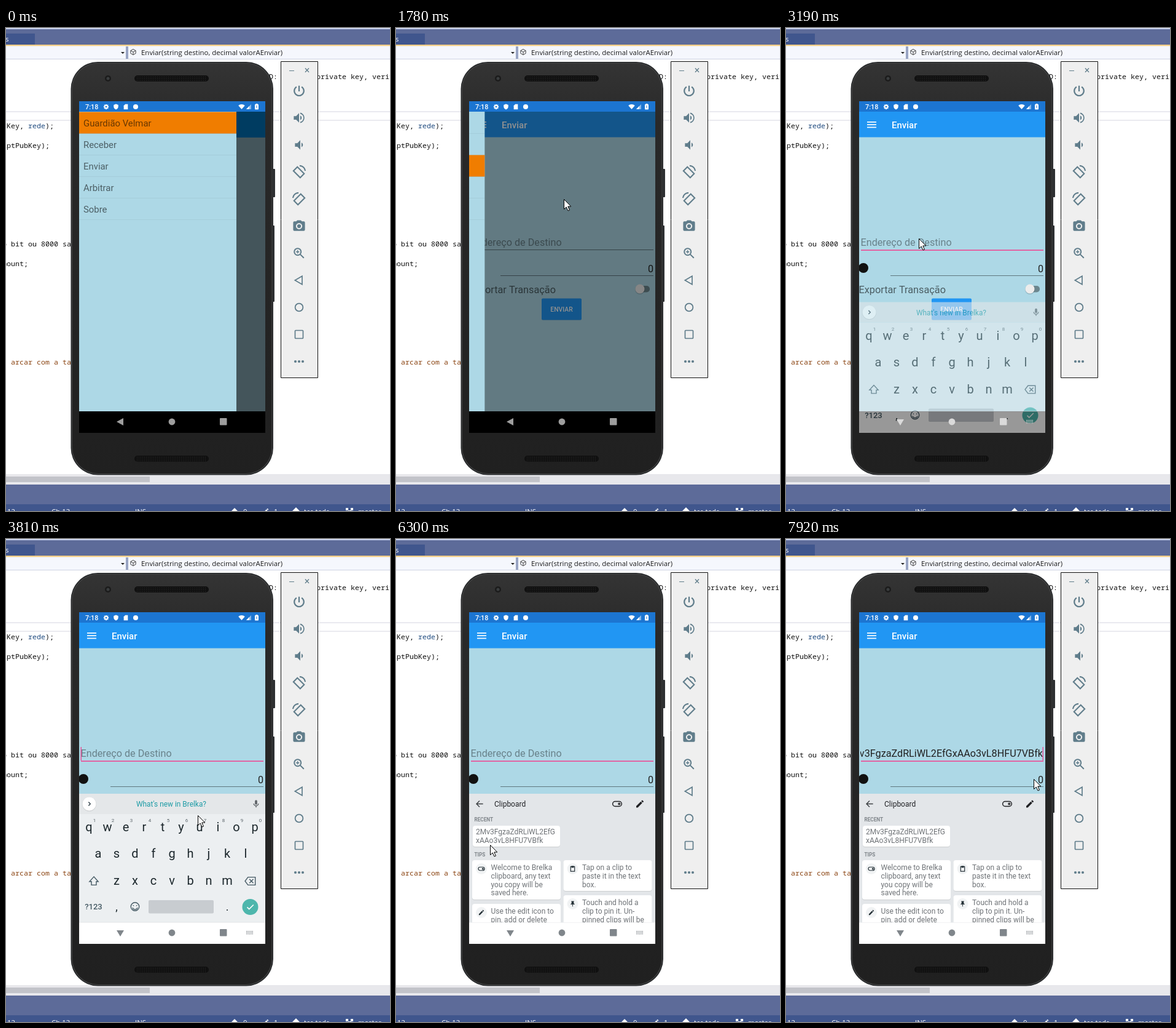
An HTML page with a canvas that plays this animation: 625 px wide and 785 px high, repeating every 8000 ms.

```html
<!DOCTYPE html>
<html lang="pt">
<head>
<meta charset="utf-8">
<style>
html, body { margin: 0; width: 100%; height: 100%; overflow: hidden; background: #fff; }
canvas { display: block; }
</style>
</head>
<body>
<canvas id="stage" width="625" height="785"></canvas>
<script>
const LOOP = 8000;
const stage = document.getElementById('stage').getContext('2d');
const layer = new OffscreenCanvas(625, 785).getContext('2d');
let ctx = stage;

const ADDRESS = '2Mv3FgzaZdRLiWL2EfGxAAo3vL8HFU7VBfk';
const MENU = ['Guardião Velmar', 'Receber', 'Enviar', 'Arbitrar', 'Sobre'];
const PINK = '#e8559a', SKY = '#add8e6', SLATE = '#607d8b', INK = '#1c272c', GREY = '#5f6468';

// Pointer tip: time, x, y
const POINTER = [
  [150, 538, 768], [620, 140, 210], [850, 200, 237], [1400, 200, 237], [1780, 273, 278],
  [2090, 206, 333], [2330, 206, 333], [2480, 216, 342], [3440, 216, 342], [3820, 314, 452],
  [4110, 114, 446], [4290, 128, 434], [4750, 128, 434], [4980, 239, 449], [5290, 309, 432],
  [5830, 309, 432], [6300, 153, 497], [6600, 150, 490], [7170, 150, 490], [7920, 403, 390]
];

// Icons on a 24 unit grid
const ICON = {
  power: 'M12 3v10M7.5 5a8.5 8.5 0 1 0 9 0',
  speaker: 'M3 9v6h4l5 5V4L7 9H3z',
  waveNear: 'M16.5 12A4.5 4.5 0 0 0 14 8v8a4.5 4.5 0 0 0 2.5-4z',
  waveFar: 'M14 3.2v2a7 7 0 0 1 0 13.6v2a9 9 0 0 0 0-17.6z',
  rotateLeft: 'M9 3L2 10l12 12 7-7zM13 1a10 10 0 0 1 10 9',
  rotateRight: 'M15 3l7 7-12 12-7-7zM11 1A10 10 0 0 0 1 10',
  camera: 'M9 2L7.2 4H4a2 2 0 0 0-2 2v12a2 2 0 0 0 2 2h16a2 2 0 0 0 2-2V6a2 2 0 0 0-2-2h-3.2L15 2z',
  lens: 'M16.5 12a4.5 4.5 0 1 1-9 0a4.5 4.5 0 0 1 9 0',
  search: 'M15.5 9.5a6 6 0 1 1-12 0a6 6 0 0 1 12 0M14 14l6.5 6.5',
  plus: 'M6.5 9.5h6M9.5 6.5v6',
  left: 'M18 4v16L4 12z',
  clipboard: 'M5 4h14v17H5zM9 3h6v4H9z',
  clipLines: 'M8 11h8M8 14h8M8 17h5',
  pencil: 'M3 17.2V21h3.8L17.8 9.9l-3.7-3.7zM20.7 7a1 1 0 0 0 0-1.4l-2.3-2.3a1 1 0 0 0-1.4 0l-1.8 1.8 3.7 3.7z',
  mic: 'M12 14a3 3 0 0 0 3-3V5a3 3 0 0 0-6 0v6a3 3 0 0 0 3 3z',
  micStand: 'M6 11a6 6 0 0 0 12 0M12 17v4',
  pin: 'M16 9V4h1V2H7v2h1v5a3 3 0 0 1-3 3v2h6v7l1 1 1-1v-7h6v-2a3 3 0 0 1-3-3z',
  back: 'M21 12H4M12 4l-8 8 8 8',
  more: 'M10 7l5 5-5 5',
  less: 'M14 7l-5 5 5 5',
  toggle: 'M7 6h10a6 6 0 0 1 0 12H7a6 6 0 0 1 0-12zM19 12a2 2 0 1 1-4 0a2 2 0 0 1 4 0',
  shift: 'M12 3l-9 10h4v7h10v-7h4z',
  erase: 'M8 4h15v16H8l-6-8zM11 8l8 8M19 8l-8 8',
  smile: 'M21 12a9 9 0 1 1-18 0a9 9 0 0 1 18 0M7 14a5 4 0 0 0 10 0M8.5 8.5v2M15.5 8.5v2',
  sticker: 'M20 14V4H4v16h10zM20 14h-6v6M8 8v2M14 8v2M8 13q3 3 6 0',
  check: 'M5 12.5l4.5 4.5L19.5 7',
  gear: 'M12 1v22M1 12h22M4 4l16 16M20 4L4 20',
  shield: 'M12 1L3 5v6c0 6 4 10 9 12 5-2 9-6 9-12V5z',
  card: 'M20 2H10L4 8v14h16z',
  cube: 'M12 2l9 5v10l-9 5-9-5V7zM3 7l9 5 9-5M12 12v10',
  pointer: 'M0 0V16L3.7 12.5 6.5 18.5 9 17.5 6.3 11.5H11.3z'
};
for (const name in ICON) ICON[name] = new Path2D(ICON[name]);

const ramp = (t, a, b) => Math.min(1, Math.max(0, (t - a) / (b - a)));

function rect(x, y, w, h, fill, radius = 0) {
  ctx.fillStyle = fill;
  ctx.beginPath();
  ctx.roundRect(x, y, w, h, radius);
  ctx.fill();
}
function box(x, y, w, h, color, width = 1, radius = 0) {
  ctx.strokeStyle = color;
  ctx.lineWidth = width;
  ctx.beginPath();
  ctx.roundRect(x, y, w, h, radius);
  ctx.stroke();
}
function dot(x, y, r, fill) {
  ctx.fillStyle = fill;
  ctx.beginPath();
  ctx.arc(x, y, r, 0, 7);
  ctx.fill();
}
function poly(fill, ...points) {
  ctx.fillStyle = fill;
  ctx.beginPath();
  for (let i = 0; i < points.length; i += 2) ctx.lineTo(points[i], points[i + 1]);
  ctx.fill();
}
function text(s, x, y, size, color, { align = 'left', font = 'Roboto', weight = 400 } = {}) {
  ctx.font = `${weight} ${size}px "${font}", sans-serif`;
  ctx.textAlign = align;
  ctx.fillStyle = color;
  ctx.fillText(s, x, y);
}
function icon(name, x, y, size, color, stroke = 0) {
  ctx.save();
  ctx.translate(x - size / 2, y - size / 2);
  ctx.scale(size / 24, size / 24);
  ctx.fillStyle = ctx.strokeStyle = color;
  if (stroke) {
    ctx.lineWidth = stroke * 24 / size;
    ctx.stroke(ICON[name]);
  } else ctx.fill(ICON[name]);
  ctx.restore();
}
function clipped(x, y, w, h, draw) {
  ctx.save();
  ctx.beginPath();
  ctx.rect(x, y, w, h);
  ctx.clip();
  draw();
  ctx.restore();
}
function faded(alpha, draw) {
  if (alpha <= 0) return;
  ctx.save();
  ctx.globalAlpha *= alpha;
  draw();
  ctx.restore();
}

function editor() {
  const ui = (s, x, y, color = '#fff') => text(s, x, y, 11.45, color, { font: 'Open Sans' });
  const code = (s, x, y, color = '#111') => text(s, x, y, 11.67, color, { font: 'Noto Sans Mono' });
  rect(0, 0, 625, 785, '#fff');
  rect(0, 0, 625, 27, '#5d6b99');
  rect(0, 0, 625, 2, '#ccd5f0');
  rect(0, 9, 47, 18, '#40568d');
  ui('s', -1, 22);
  rect(0, 27, 625, 2.5, '#f5cc84');
  rect(0, 29.5, 625, 20.5, '#f5f7fd');
  rect(0, 50, 625, 1, '#cfd4e3');
  rect(195, 30, 4, 20, '#99a5c4');
  poly('#222', 187, 39, 193, 39, 190, 42);
  icon('cube', 207, 39, 11, '#444', 1);
  ui('Enviar(string destino, decimal valorAEnviar)', 220, 44, '#1e1e1e');
  rect(0, 135, 625, 2, '#eaeaf0');
  rect(0, 149, 625, 2, '#eaeaf0');
  code('D:', 428, 83);
  code('private key, verif', 505, 83);
  code('tKey, ', -6, 163);
  code('rede', 36, 163, '#1f4a7f');
  code(');', 64, 163);
  code('iptPubKey);', -6, 195);
  code('o bit ou 8000 sat', -6, 355);
  code('mount;', -6, 387);
  code('a arcar com a taxa', -6, 547, '#8b4513');

  rect(0, 725, 625, 17, '#e8e8ec');
  rect(0, 729, 234, 9, '#c2c3c9');
  rect(0, 742, 625, 32, '#5d6b99');
  rect(0, 774, 625, 11, '#40568d');
  ui('12', 2, 790);
  ui('Ch 13', 74, 790);
  ui('INS', 210, 790);
  ui('0', 386, 790);
  ui('1', 436, 790);
  ui('tcc-tads', 485, 790);
  ui('master', 573, 790);
  poly('#fff', 372, 780, 377, 785, 367, 785);
  icon('pencil', 423, 785, 11, '#fff');
  poly('#fff', 472, 779, 479, 786, 465, 786);
  rect(553, 780, 4, 4, '#fff');
  rect(561, 780, 4, 4, '#fff');
  rect(557, 784, 5, 1, '#fff');
}

function phoneBody() {
  rect(434, 229, 4, 46, '#303234', 1);
  rect(434, 321, 3, 124, '#303234', 1);
  const shade = ctx.createLinearGradient(0, 55, 0, 726);
  shade.addColorStop(0, '#343434');
  shade.addColorStop(.15, '#292929');
  shade.addColorStop(1, '#202020');
  rect(105.5, 55, 329.5, 671.5, '#26282a', 44);
  rect(107, 56.5, 326.5, 668.5, '#454545', 43);
  rect(108, 57.5, 324.5, 666.5, shade, 42);
  dot(166, 82, 5, '#1b1b1b');
  dot(166, 82, 2.5, '#3a3d3e');
  for (const y of [77, 695]) {
    rect(209, y, 121, 10, '#101010', 5);
    for (let x = 213; x < 327; x += 3)
      for (let row = 2; row < 9; row += 3) rect(x, y + row, 1, 1, '#303030');
  }
}

function emulatorBar() {
  rect(447, 54, 61, 515, '#efefef');
  box(447.5, 54.5, 60, 514, '#111');
  rect(461, 69, 8, 1, SLATE);
  text('×', 490, 74, 16, SLATE, { align: 'center' });
  const at = (name, y, size = 23, stroke = 0) => icon(name, 477, y, size, SLATE, stroke);
  at('power', 102, 22, 2.2);
  for (const name of ['speaker', 'waveNear', 'waveFar']) at(name, 146);
  icon('speaker', 479, 190, 23, SLATE);
  icon('waveNear', 479, 190, 23, SLATE);
  at('rotateLeft', 234, 22, 2.1);
  at('rotateRight', 278, 22, 2.1);
  at('camera', 322);
  icon('lens', 477, 322, 22, '#efefef', 2);
  at('search', 366, 22, 2);
  at('plus', 366, 22, 1.4);
  at('left', 410, 20, 1.7);
  at('lens', 454, 34, 1.8);
  box(470.5, 491.5, 13, 13, SLATE, 1.7, 1);
  for (const x of [471, 477, 483]) dot(x, 542, 2.1, SLATE);
}

function statusBar() {
  rect(119, 119, 303, 17.5, '#1c75d1');
  text('7:18', 129, 132, 10.8, '#fff', { weight: 500 });
  icon('gear', 163, 128, 9, '#fff', 2);
  dot(163, 128, 1.3, '#1c75d1');
  icon('shield', 179, 128, 10, '#fff');
  icon('card', 195, 128, 10, '#fff');
  dot(211, 128, 4, '#fff');
  ctx.fillStyle = '#fff';
  ctx.beginPath();
  ctx.moveTo(383.5, 132);
  ctx.arc(383.5, 132, 8, -2.3, -.84);
  ctx.fill();
  poly('#8fbbe8', 391, 132, 399, 132, 399, 124);
  poly('#fff', 391, 132, 396, 132, 396, 127);
  rect(405, 124, 6, 8.5, '#fff', 1);
  rect(406.5, 123, 3, 2, '#fff');
  rect(407.5, 126, 1, 4, '#1c75d1');
}

function navBar(color, keyboardOpen) {
  if (keyboardOpen) poly(color, 180, 636, 192, 636, 186, 646);
  else poly(color, 191, 634, 191, 646, 180, 640);
  dot(270, 640, 5.4, color);
  rect(348, 634, 11.5, 11.5, color, 1);
  if (keyboardOpen)
    for (let i = 0; i < 15; i++) rect(391 + i % 5 * 2.4, 637 + Math.floor(i / 5) * 2.2, 1.4, 1.2, color);
}

function sendPage(t) {
  const focused = t >= 2710, pasted = t >= 6920;
  rect(119, 136, 303, 487, SKY);
  rect(119, 136, 303, 41.5, '#2196f3');
  for (const y of [152, 156.3, 160.6]) rect(132, y, 15, 1.7, '#fff');
  text('Enviar', 172, 163, 15, '#fff', { weight: 500 });

  clipped(121, 330, 298, 40, () => {
    if (pasted) text(ADDRESS, 418, 354, 16.2, '#212121', { align: 'right' });
    else text('Endereço de Destino', 121.5, 354, 16.2, 'rgba(0,0,0,.4)');
  });
  if (focused) rect(122, 360.2, 297, 1.7, PINK);
  else rect(122, 360, 297, 1, 'rgba(0,0,0,.45)');
  const blinkStart = pasted ? 6920 : 2650;
  if (focused && (t - blinkStart) % 1000 < 500) rect(pasted ? 417.5 : 121.5, 338, 1.5, 22, PINK);

  dot(126, 390, 8, '#111');
  text('0', 419, 396.5, 16.2, '#212121', { align: 'right' });
  rect(170, 402, 249, 1, 'rgba(0,0,0,.45)');
  text('Exportar Transação', 118.5, 430.5, 16.3, 'rgba(0,0,0,.57)');
  rect(391, 419, 22, 10.5, 'rgba(0,0,0,.38)', 5);
  dot(397, 425, 8, 'rgba(0,0,0,.15)');
  dot(397, 424, 7.6, '#ececec');
  rect(237, 440, 65, 35, 'rgba(0,0,0,.12)', 2);
  rect(237, 439.5, 65, 35, '#2196f3', 2);
  text('ENVIAR', 269.5, 461, 10.4, '#fff', { align: 'center', weight: 500 });
}

function drawer(t) {
  const left = 119 - 256 * (1 - (1 - ramp(t, 1400, 1956)) ** 2);
  rect(left, 136, 256, 487, SKY);
  const selected = t < 1040 ? 0 : 2;
  MENU.forEach((label, i) => {
    const y = 136.5 + i * 35;
    if (i === selected) rect(left, y, 256, 35, '#f07d00');
    rect(left, y + 34.5, 256, 1, 'rgba(0,0,0,.05)');
    text(label, left + 7, y + 23, 14.9, 'rgba(0,0,0,.56)');
  });
}

function keyStrip(t) {
  dot(135.5, 431, 11.5, 'rgba(0,0,0,.1)');
  dot(135.5, 430.5, 11, '#fff');
  icon(t < 4370 ? 'more' : 'less', 135.5, 430.5, 14, '#37474f', 1.5);
  const tools = ramp(t, 4450, 4670);
  faded(1 - tools, () => text("What's new in Brelka?", 269, 435, 11.9, '#1c9ba5', { align: 'center' }));
  faded(tools, () => {
    icon('search', 177, 431, 16, GREY, 1.7);
    icon('sticker', 221, 430.5, 16, GREY, 1.5);
    text('GIF', 264, 434.5, 10.5, GREY, { align: 'center', weight: 900 });
    icon('clipboard', 309, 430.5, 16, GREY, 1.4);
    icon('clipLines', 309, 430.5, 16, GREY, 1.4);
    rect(336, 422, 1, 17, '#cdd1d4');
    for (const x of [359, 364, 369]) dot(x, 431, 1.5, GREY);
  });
  icon('mic', 407, 430.5, 15, GREY);
  icon('micStand', 407, 430.5, 15, GREY, 1.4);
}

function keyRows() {
  const row = (letters, x, y) => [...letters].forEach((c, i) =>
    text(c, x + i * 30, y, 20, INK, { align: 'center' }));
  row('qwertyuiop', 135, 475);
  [...'1234567890'].forEach((n, i) =>
    text(n, 144 + i * 30, 460, 8, '#5c666b', { align: 'center' }));
  row('asdfghjkl', 150, 518);
  row('zxcvbnm', 180, 562);
  icon('shift', 143, 556, 19, '#455a64', 1.4);
  icon('erase', 397, 556, 19, '#455a64', 1.4);
  text('?123', 142.5, 602, 13, '#455a64', { align: 'center', weight: 500 });
  text(',', 180, 604, 18, INK, { align: 'center' });
  icon('smile', 210, 597.5, 18, '#455a64', 1.4);
  rect(232, 587, 106, 21.5, '#c8ccd0', 2);
  text('.', 360, 604, 18, INK, { align: 'center' });
  dot(397.5, 598, 13, '#4db6ac');
  icon('check', 397.5, 598, 17, '#fff', 1.6);
}

function clipboardPanel(t) {
  rect(119, 414, 303, 209, '#e3e6e9');
  icon('back', 136, 430.5, 15, '#3c4043', 1.4);
  text('Clipboard', 160, 435, 12, '#202124');
  icon('toggle', 360, 430.5, 16, '#202124', 1.5);
  icon('pencil', 397, 430.5, 16, '#202124');
  const card = (x, y, w, h) => {
    rect(x, y + 1, w, h, 'rgba(0,0,0,.1)', 4);
    rect(x, y, w, h, '#fff', 4);
  };
  const lines = (list, x, y) => list.forEach((s, i) => text(s, x, y + i * 13.8, 12, '#6f7377'));
  const tip = (x, y, h, name, stroke, list) => {
    card(x, y, 144, h);
    dot(x + 15, y + 14, 9, '#f1f3f4');
    icon(name, x + 15, y + 14, 11, '#263238', stroke);
    lines(list, x + 30.5, y + 16);
  };
  text('RECENT', 127.5, 459, 8.2, '#80868b', { weight: 700 });
  faded(ramp(t, 5440, 5750), () => {
    card(125, 466, 142, 34);
    if (t > 6600 && t < 7090) rect(126, 466, 105, 34, 'rgba(0,0,0,.06)', 4);
    lines([ADDRESS.slice(0, 19), ADDRESS.slice(19)], 130, 480);
    text('TIPS', 127.5, 516, 8.2, '#80868b', { weight: 700 });
  });
  faded(ramp(t, 5440, 5900), () => clipped(119, 500, 303, 123, () => {
    tip(124, 522, 64, 'toggle', 1.2, ['Welcome to Brelka', 'clipboard, any text', 'you copy will be', 'saved here.']);
    tip(272.5, 522, 50, 'clipboard', 1.2, ['Tap on a clip to', 'paste it in the text', 'box.']);
    tip(272.5, 579, 60, 'pin', 0, ['Touch and hold a', 'clip to pin it. Un-', 'pinned clips will be']);
    tip(124, 593, 50, 'pencil', 0, ['Use the edit icon to', 'pin, add or delete']);
  }));
}

function keyboard(t, drop) {
  rect(119, 623, 303, 35, '#fff');
  clipped(119, 414, 303, 209, () => {
    rect(119, 414 + drop, 303, 33, '#e4e7e9');
    rect(119, 447 + drop, 303, 209, '#eceff1');
  });
  clipped(119, 414, 303, 244, () => {
    ctx.translate(0, drop);
    keyStrip(t);
    keyRows();
  });
  rect(119, 622.5, 303, 1, '#e3e6e8');
  faded(ramp(t, 5380, 5600), () => clipboardPanel(t));
}

// The keyboard fades as one sheet, so it is composed apart first.
function keyboardSheet(t, shown) {
  ctx = layer;
  ctx.clearRect(0, 0, 625, 785);
  keyboard(t, 78 * (1 - shown));
  ctx = stage;
  faded(shown, () => ctx.drawImage(layer.canvas, 0, 0));
}

function screen(t) {
  rect(119, 119, 303, 539, '#000');
  statusBar();
  clipped(119, 136, 303, 487, () => {
    if (t >= 1400) sendPage(t);
    else if (t >= 1110) rect(119, 136, 303, 487, '#fff');
    else {
      rect(119, 136, 303, 487, SKY);
      rect(119, 136, 303, 42, '#0099f5');
    }
    rect(119, 136, 303, 487, `rgba(0,0,0,${.605 * (1 - ramp(t, 1659, 2090))})`);
    if (t < 1956) drawer(t);
  });
  const shown = ramp(t, 3060, 3280);
  if (shown > 0) keyboardSheet(t, shown);
  navBar(shown > .8 ? '#80868b' : shown > .5 ? '#dadada' : '#9e9e9e', shown > 0);
}

function pointer(t) {
  if (t < POINTER[0][0]) return;
  let i = 0;
  while (i < POINTER.length - 2 && POINTER[i + 1][0] <= t) i++;
  const [t0, x0, y0] = POINTER[i], [t1, x1, y1] = POINTER[i + 1];
  const k = ramp(t, t0, t1);
  const x = Math.round(x0 + (x1 - x0) * k) + 12.5, y = Math.round(y0 + (y1 - y0) * k) + 12.5;
  icon('pointer', x, y, 24, '#fff');
  icon('pointer', x, y, 24, '#000', 1);
}

function frame(now) {
  const t = now % LOOP;
  editor();
  phoneBody();
  emulatorBar();
  screen(t);
  pointer(t);
  requestAnimationFrame(frame);
}
requestAnimationFrame(frame);
</script>
</body>
</html>
```
